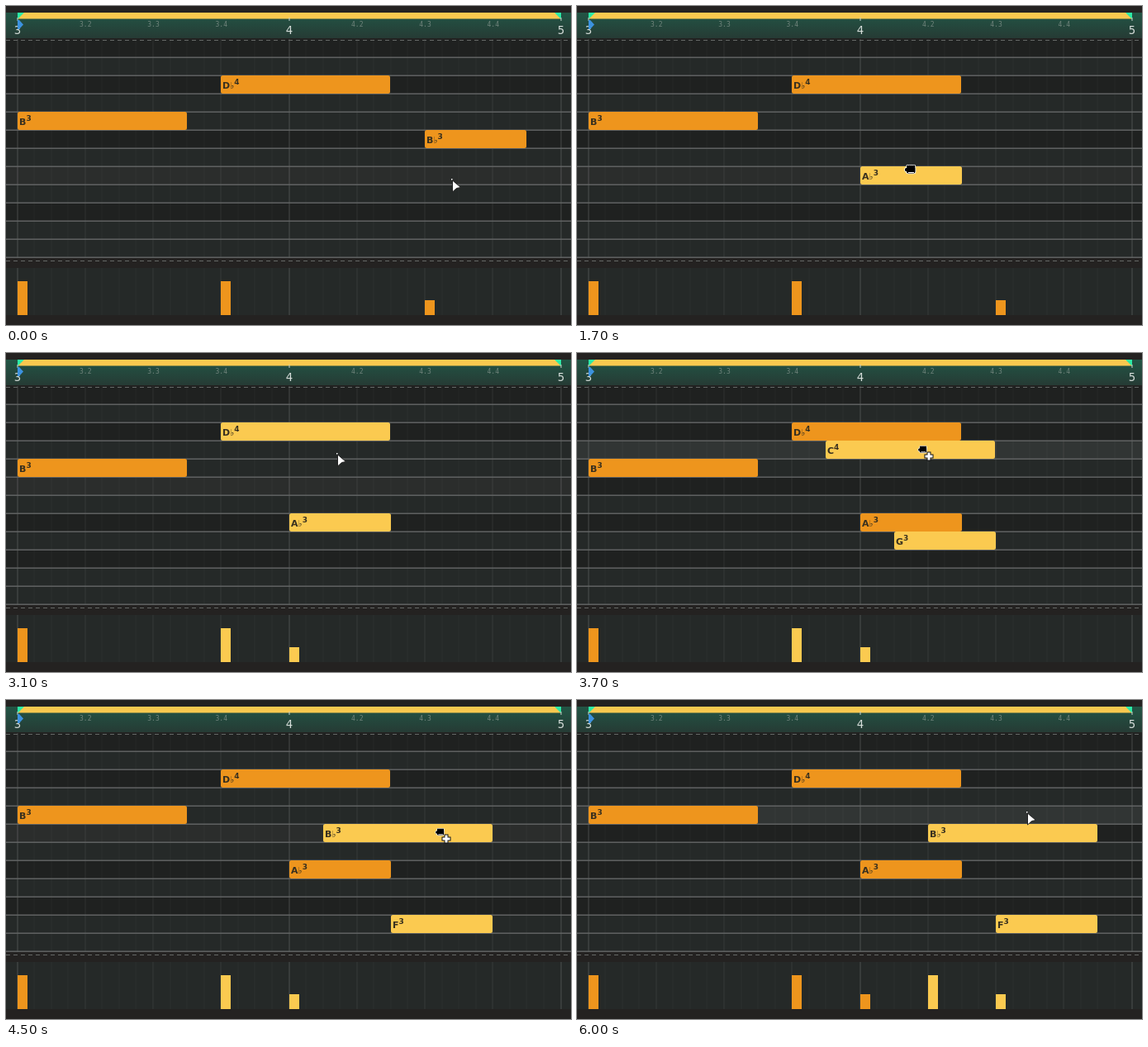
Write an HTML page with a canvas that moves like this. It is 684 by 386 pixels and loops after 6.1 s.

```html
<!DOCTYPE html>
<html>
<head>
<meta charset="utf-8">
<style>
html, body { margin: 0; width: 684px; height: 386px; overflow: hidden; background: #242221; }
canvas { display: block; }
</style>
</head>
<body>
<canvas id="stage" width="684" height="386"></canvas>
<script>
const ctx = document.getElementById('stage').getContext('2d');
const W = 684, LOOP = 6100, TICK = 100;
const LEFT = 14, BEAT = 82.25, SNAP = BEAT / 2, TOP = 40, ROW = 22;
const PITCHES = 'E♭4 D4 D♭4 C4 B3 B♭3 A3 A♭3 G3 G♭3 F3 E3'.split(' ');
const ORANGE = '#ee951d', HOVER = '#f7ac33', YELLOW = '#fbca50';
const MOVE = { start: 900, end: 1800 };
const LASSO = { start: 2200, end: 2900 };
const COPY = { start: 3400, end: 5000 };

// Pointer gestures: start, end, x, y
const GESTURES = [
  [0, 300, 541, 240], [300, 700, 556, 158], [900, 1600, 403, 198], [1800, 2200, 544, 85],
  [2200, 2800, 435, 202], [2900, 3300, 390, 95], [3400, 3700, 418, 117],
  [3700, 4500, 525, 160], [4500, 4900, 545, 160], [5200, 5600, 545, 136]
];

const clamp = (v, a, b) => Math.min(b, Math.max(a, v));
const easeOut = u => 1 - (1 - u) ** 2;
const during = (t, span) => t >= span.start && t < span.end;
const rowAt = y => Math.floor((y - TOP) / ROW);
const beatX = b => LEFT + b * BEAT;

function pointer(t) {
  let x = 540, y = 210;
  for (const [start, end, toX, toY] of GESTURES) {
    const k = easeOut(clamp((t - start) / (end - start), 0, 1));
    x += (toX - x) * k;
    y += (toY - y) * k;
  }
  return { x, y };
}

// The note as carried by a drag, snapped to half beats and rows
function dragged(note, t, { start, end }) {
  const a = pointer(start), b = pointer(clamp(t, start, end));
  const beat = note.beat + Math.round((b.x - a.x) / SNAP) / 2;
  return { ...note, beat, row: note.row + rowAt(b.y) - rowAt(a.y) };
}

function bounds({ beat, row, length }) {
  const x = Math.floor(beatX(beat)), w = Math.floor(length * BEAT);
  return { x, y: TOP + row * ROW, w, right: x + w };
}

function isOver(p, note) {
  const { x, right } = bounds(note);
  return rowAt(p.y) === note.row && p.x >= x && p.x < right;
}

function rect(color, x, y, w, h) {
  ctx.fillStyle = color;
  ctx.fillRect(x, y, w, h);
}

function poly(color, ...pts) {
  ctx.fillStyle = color;
  ctx.beginPath();
  for (let i = 0; i < pts.length; i += 2) ctx.lineTo(pts[i], pts[i + 1]);
  ctx.closePath();
  ctx.fill();
}

function text(s, x, y, font, color, align = 'left') {
  ctx.font = font + ', sans-serif';
  ctx.fillStyle = color;
  ctx.textAlign = align;
  ctx.fillText(s, x, y);
  return x + ctx.measureText(s).width;
}

function background(hoverRow) {
  rect('#242221', 0, 0, W, 386);
  rect('#252928', 0, TOP, W, 265);
  rect('#252928', 0, 317, W, 57);
  PITCHES.forEach((name, i) => {
    const y = TOP + i * ROW;
    if (name[1] === '♭') rect('#1f2120', 0, y, W, ROW);
    if (i === hoverRow) rect('rgba(255,255,255,.055)', 0, y, W, ROW);
  });
  for (let i = 0; i <= 32; i++) {
    const x = Math.floor(beatX(i / 4));
    const alpha = i % 16 === 0 ? .18 : i % 4 === 0 ? .08 : .035;
    for (const [y, h] of [[TOP, 265], [317, 57]]) rect(`rgba(255,255,255,${alpha})`, x - .5, y, 1, h);
  }
  PITCHES.forEach((_, i) => rect('#646766', 0, TOP + (i + 1) * ROW - .5, W, 1.4));
  for (let x = 0; x < W; x += 9) for (const y of [41, 308]) rect('#656866', x, y, 5, 1);
}

function ruler() {
  const green = ctx.createLinearGradient(0, 8, 0, TOP);
  green.addColorStop(0, '#225545');
  green.addColorStop(1, '#263a34');
  rect(green, 0, 8, W, 31);
  rect('#f9c94f', LEFT, 8, 658, 7.5);
  poly('#2ceaa6', 14, 8, 22, 8, 14, 16);
  poly('#2ceaa6', 672, 8, 664, 8, 672, 16);
  for (let i = 0; i <= 8; i++) {
    const x = beatX(i), bar = 3 + Math.floor(i / 4);
    if (i % 4) {
      text(`${bar}.${i % 4 + 1}`, x, 25, '8px "DejaVu Sans Mono"', '#6f837b', 'center');
    } else {
      rect('#c5d2cb', x - .5, 14, 1, 4);
      text(bar, x, 34, '13.33px "DejaVu Sans"', '#d5ddd9', 'center');
    }
  }
  poly('#3c92df', 14, 17, 16, 17, 21, 22.5, 16, 28, 14, 28);
}

function drawNote(note, color) {
  const { x, y, w } = bounds(note), name = PITCHES[note.row], ink = '#38301f';
  ctx.fillStyle = color;
  ctx.beginPath();
  ctx.roundRect(x, y, w, ROW, 2.5);
  ctx.fill();
  let end = text(name[0], x + 2, y + 16, 'bold 11px "DejaVu Sans"', ink);
  if (name[1] === '♭') end = text('♭', end, y + 16, '11px "DejaVu Sans"', ink);
  text(name.at(-1), end, y + 11, 'bold 9px "DejaVu Sans"', ink);
}

function drawVelocity({ beat, velocity }, color) {
  rect(color, Math.floor(beatX(beat)), 374 - velocity, 12, velocity);
}

function marquee(p) {
  const a = pointer(LASSO.start);
  ctx.beginPath();
  ctx.roundRect(p.x, a.y + .5, a.x - p.x, p.y - a.y, 2);
  ctx.fillStyle = 'rgba(255,255,255,.075)';
  ctx.strokeStyle = 'rgba(255,255,255,.22)';
  ctx.lineWidth = 1.3;
  ctx.fill();
  ctx.stroke();
}

function arrow() {
  rect('#fff', -1, -1, 1.5, 1.5);
  ctx.strokeStyle = '#222';
  ctx.lineWidth = 1;
  poly('#fff', .5, 1, 10.5, 9.5, 5.5, 10.5, .5, 15);
  ctx.stroke();
}

function moveCross() {
  for (let i = 0; i < 4; i++) {
    poly('#fff', 8, 0, 4.5, -2.7, 4.5, 2.7);
    rect('#fff', 1.5, -.5, 1, 1);
    ctx.rotate(Math.PI / 2);
  }
}

function hand() {
  const fist = new Path2D();
  fist.roundRect(-4, -4, 10.5, 8.5, 2);
  fist.roundRect(-6, -2, 5, 4, 1.5);
  for (let x = -2.5; x < 6; x += 2.5) fist.roundRect(x - 1.3, -5.5, 2.6, 4, 1.3);
  ctx.strokeStyle = '#fff';
  ctx.lineWidth = 1.6;
  ctx.stroke(fist);
  ctx.fillStyle = '#000';
  ctx.fill(fist);
  rect('#fff', -2, 3, 7, 1);
}

function copyHand() {
  ctx.save();
  ctx.scale(.8, .8);
  hand();
  ctx.restore();
  for (const [color, arm, bar] of [['#111', 5.5, 2.5], ['#fff', 4.5, 1.5]]) {
    rect(color, 8 - arm, 8 - bar, arm * 2, bar * 2);
    rect(color, 8 - bar, 8 - arm, bar * 2, arm * 2);
  }
}

function draw(t) {
  // The view trails the pointer by one tick.
  const seen = Math.max(0, t - TICK), p = pointer(seen), tip = pointer(t);
  const moving = during(t, MOVE), lassoing = during(t, LASSO), copying = during(t, COPY);
  const copied = t >= COPY.start, dropped = t >= COPY.end;

  const base = { beat: 0, row: 4, length: 2.5, velocity: 41 };
  const high = { beat: 3, row: 2, length: 2.5, velocity: 41 };
  const start = { beat: 6, row: 5, length: 1.5, velocity: 18 };
  const low = dragged(start, seen, MOVE);
  const copies = copied ? [high, low].map(n => dragged(n, seen, COPY)) : [];
  const notes = [base, high, low, ...copies];

  const corner = pointer(Math.min(seen, LASSO.end));
  const caught = n => t >= LASSO.start && corner.x < bounds(n).right && corner.y > bounds(n).y;
  const selected = n => copied ? copies.includes(n)
    : n === high ? caught(n)
    : n === low && (t >= LASSO.start ? caught(n) : t >= MOVE.start);
  const free = !moving && !lassoing && !copying;
  const hovered = n => free && isOver(p, n);

  background(rowAt(p.y));
  ruler();
  for (const n of notes) drawNote(n, selected(n) ? YELLOW : hovered(n) ? HOVER : ORANGE);

  // Velocity bars follow only when the button is released.
  const pick = on => on ? YELLOW : ORANGE;
  drawVelocity(base, ORANGE);
  drawVelocity(high, pick(t >= LASSO.end && !dropped));
  drawVelocity(t < MOVE.end ? start : low, pick(t >= MOVE.end && !dropped));
  if (dropped) for (const n of copies) drawVelocity(n, YELLOW);
  if (lassoing) marquee(p);

  const cursor = moving ? hand : copying ? copyHand : notes.some(hovered) ? moveCross : arrow;
  ctx.save();
  ctx.translate(Math.round(tip.x), Math.round(tip.y));
  cursor();
  ctx.restore();
}

function frame() {
  draw(Math.floor(performance.now() % LOOP / TICK) * TICK);
  requestAnimationFrame(frame);
}
frame();
</script>
</body>
</html>
```
